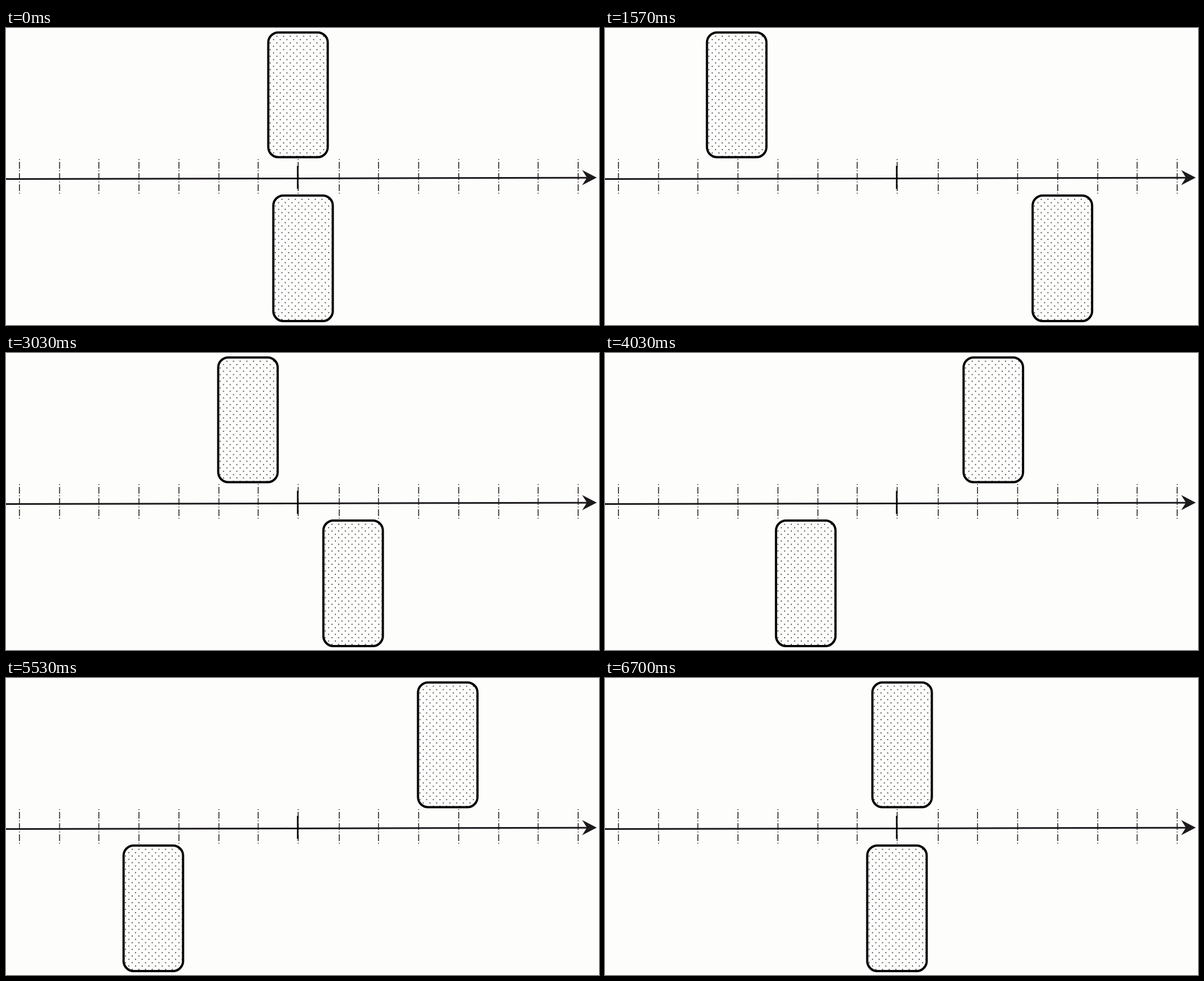
Animation, 1057 px wide and 530 px high, one loop 6730 ms. Source, as an HTML page:

```html
<!DOCTYPE html>
<html lang="en">
<head>
<meta charset="utf-8">
<title>Opposed oscillation</title>
<style>
  html, body { margin: 0; width: 100%; height: 100%; overflow: hidden; background: #fdfdfb; }
  svg { display: block; width: 100%; height: 100%; }
  .card { fill: url(#dots); stroke: #050508; stroke-width: 4; }
  .ticks { stroke: #222; stroke-width: 1.6; stroke-dasharray: 1.5 3.5 12 3; }
</style>
</head>
<body>
<svg viewBox="0 0 1057 530">
  <defs>
    <pattern id="dots" x="1" y="113" width="11.9" height="11.9" patternUnits="userSpaceOnUse">
      <rect width="12" height="12" fill="#fdfdfb"/>
      <path d="M2 2h2v1.7h-2zM7.95 7.95h2v1.7h-2z" fill="#3c3c40"/>
    </pattern>
  </defs>
  <g class="ticks" id="ticks"></g>
  <path d="M0 269.6L1040 267.2" stroke="#1c181c" stroke-width="3"/>
  <path d="M1053 267L1027 253.5L1035.5 267L1027 280.5Z" fill="#1c1a1c"/>
  <path d="M520 246V287" stroke="#050505" stroke-width="2.8"/>
  <rect class="card" id="upper" x="-53" y="8" width="106" height="222.5" rx="18"/>
  <rect class="card" id="lower" x="-53" y="8" width="106" height="224" rx="18"/>
</svg>
<script>
  const LOOP = 6730, CENTER = 525, REACH = 292, DROP = 291;
  // Zero crossings in steps of 1/30 s; the left swing is slightly longer.
  const START = -0.5, MIDDLE = 101.62, END = 201.5;
  const upper = document.getElementById('upper');
  const lower = document.getElementById('lower');

  const tickXs = [24, 95.5, 165.5, 237, 308.3, 379.5, 449.5, 520.7,
                  594, 664, 735.5, 807, 878.3, 948.5, 1019.8];
  document.getElementById('ticks').innerHTML =
    tickXs.map(x => `<path d="M${x} 234V297"/>`).join('');

  // Steps begin at 0, 30 and 70 ms of every 100 ms.
  function stepAt(ms) {
    const rest = ms % 100;
    return 3 * Math.floor(ms / 100) + (rest >= 30) + (rest >= 70);
  }

  function offsetAt(step) {
    return step < MIDDLE
      ? -REACH * Math.sin(Math.PI * (step - START) / (MIDDLE - START))
      : REACH * Math.sin(Math.PI * (step - MIDDLE) / (END - MIDDLE));
  }

  function place(card, x, y) {
    card.setAttribute('transform', `translate(${x.toFixed(2)} ${y})`);
  }

  let began;
  function draw(now) {
    began ??= now;
    const offset = offsetAt(stepAt((now - began) % LOOP));
    place(upper, CENTER + offset, 0);
    place(lower, CENTER - offset, DROP);
    requestAnimationFrame(draw);
  }
  draw(performance.now());
</script>
</body>
</html>
```
